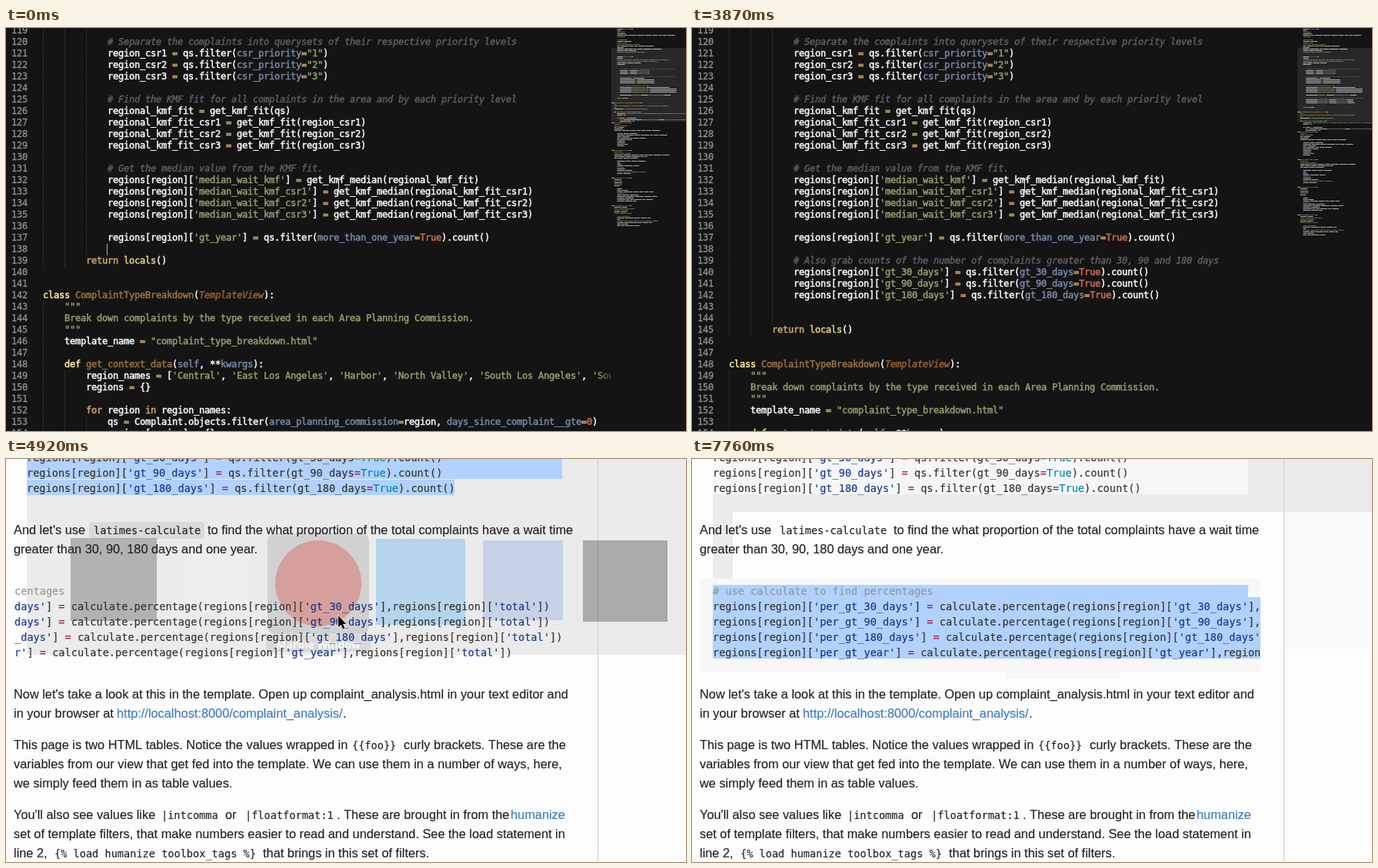
An HTML page with a canvas for the animation above (8000 ms loop, 884 by 525 pixels).

```html
<!DOCTYPE html>
<html lang="en">
<head>
<meta charset="utf-8">
<title>Editor and tutorial</title>
<style>
html, body { margin: 0; width: 884px; height: 525px; overflow: hidden; background: #141414; }
canvas { display: block; }
</style>
</head>
<body>
<canvas id="stage" width="884" height="525"></canvas>
<script>
const W = 884, H = 525, LOOP = 8000;
const ctx = document.getElementById('stage').getContext('2d');
const MONO = '"DejaVu Sans Mono", monospace';
const SANS = '"Liberation Sans", Arial, sans-serif';

// ---------- helpers ----------
const at = (steps, t) => steps.filter(s => s[0] <= t).pop();

function box(x, y, w, h, fill) {
  ctx.fillStyle = fill;
  ctx.fillRect(x, y, w, h);
}

function round(x, y, w, h, r, fill, stroke) {
  ctx.beginPath();
  ctx.roundRect(x, y, w, h, r);
  if (fill) { ctx.fillStyle = fill; ctx.fill(); }
  if (stroke) { ctx.strokeStyle = stroke; ctx.lineWidth = 3; ctx.stroke(); }
}

function disc(x, y, r, fill) {
  ctx.beginPath();
  ctx.arc(x, y, r, 0, Math.PI * 2);
  ctx.fillStyle = fill;
  ctx.fill();
}

function clipTo(x, y, w, h, draw) {
  ctx.save();
  ctx.beginPath();
  ctx.rect(x, y, w, h);
  ctx.clip();
  draw();
  ctx.restore();
}

function poly(points, fill, stroke) {
  ctx.beginPath();
  points.forEach(([x, y]) => ctx.lineTo(x, y));
  ctx.closePath();
  ctx.lineWidth = 1.5;
  ctx.lineJoin = 'round';
  ctx.strokeStyle = stroke;
  ctx.stroke();
  ctx.fillStyle = fill;
  ctx.fill();
}

// Text with a thin outline, for the heavier look of smoothed glyphs
function write(text, x, y, font, color, weight) {
  ctx.font = font;
  ctx.fillStyle = ctx.strokeStyle = color;
  ctx.lineWidth = weight;
  ctx.lineJoin = 'round';
  ctx.fillText(text, x, y);
  ctx.strokeText(text, x, y);
}

// ---------- syntax colouring ----------
function lexer(plain, rules) {
  const re = new RegExp(rules.map(r => `(${r[1]})`).join('|'), 'g');
  const cache = new Map();
  return line => {
    if (cache.has(line)) return cache.get(line);
    const out = [];
    let pos = 0;
    const add = (col, text, color, italic) => text.trim() && out.push({ col, text, color, italic });
    for (const m of line.matchAll(re)) {
      const [color, , italic] = rules[m.slice(1).findIndex(g => g !== undefined)];
      add(pos, line.slice(pos, m.index), plain);
      add(m.index, m[0], color, italic);
      pos = m.index + m[0].length;
    }
    add(pos, line.slice(pos), plain);
    cache.set(line, out);
    return out;
  };
}

const lexDark = lexer('#f8f8f8', [
  ['#5f5a60', '#.*', true],
  ['#8f9d6a', '"""|Break down .*|"[^"]*"|\'[^\']*\'?'],
  ['#f9ee98', '\\b(?:class|def)\\b'],
  ['#cda869', '\\b(?:return|for|in)\\b'],
  ['#dad085', '\\blocals\\b'],
  ['#9b703f', '(?<=def |class )\\w+'],
  ['#9b5c2e', 'TemplateView', true],
  ['#cf6a4c', '\\b(?:True|\\d+)\\b'],
  ['#7587a6', '\\w+(?==)|\\bself\\b|\\bkwargs\\b'],
  ['#cda869', '=']
]);

const lexLight = lexer('#333333', [
  ['#969896', '#.*'],
  ['#183691', "'[^']*'"],
  ['#a71d5d', '='],
  ['#0086b3', 'True']
]);

function code(tokens, x, y, size, pitch, weight) {
  for (const k of tokens) {
    const font = `${k.italic ? 'italic ' : ''}${size}px ${MONO}`;
    write(k.text, x + k.col * pitch, y, font, k.color, weight);
  }
}

// ---------- editor ----------
const FIRST = 119;
const PAD = ' '.repeat(12);
const indent = lines => lines.map(s => PAD + s);

const head = indent([
  '',
  '# Separate the complaints into querysets of their respective priority levels',
  ...[1, 2, 3].map(n => `region_csr${n} = qs.filter(csr_priority="${n}")`),
  '',
  '# Find the KMF fit for all complaints in the area and by each priority level',
  'regional_kmf_fit = get_kmf_fit(qs)',
  ...[1, 2, 3].map(n => `regional_kmf_fit_csr${n} = get_kmf_fit(region_csr${n})`),
  '',
  '# Get the median value from the KMF fit.',
  ...['', '_csr1', '_csr2', '_csr3'].map(s =>
    `regions[region]['median_wait_kmf${s}'] = get_kmf_median(regional_kmf_fit${s})`),
  '',
  "regions[region]['gt_year'] = qs.filter(more_than_one_year=True).count()",
  ''
]);

const dayCount = n => `regions[region]['gt_${n}_days'] = qs.filter(gt_${n}_days=True).count()`;
const DAYS = [30, 90, 180];
const pasted = indent([
  '# Also grab counts of the number of complaints greater than 30, 90 and 180 days',
  ...DAYS.map(dayCount)
]);

const tail = [
  '        return locals()',
  '',
  '',
  'class ComplaintTypeBreakdown(TemplateView):',
  '    """',
  '    Break down complaints by the type received in each Area Planning Commission.',
  '    """',
  '    template_name = "complaint_type_breakdown.html"',
  '    ',
  '    def get_context_data(self, **kwargs):',
  "        region_names = ['Central', 'East Los Angeles', 'Harbor', 'North Valley', 'South Los Angeles', 'South Valley']",
  '        regions = {}',
  '        ',
  '        for region in region_names:',
  '            qs = Complaint.objects.filter(area_planning_commission=region, days_since_complaint__gte=0)',
  '            regions[region] = {}'
];

const edits = [
  [0, []],
  [1640, [PAD]],
  [2090, pasted],
  [2390, [...pasted, PAD]],
  [3130, [...pasted, PAD, PAD]]
];

// time, x, line, opacity
const carets = [
  [0, 131, 138, 1], [150, 159, 138, 1], [450, 159, 138, .5], [600, 159, 138, 0],
  [1200, 131, 138, 1], [1640, 131, 139, 1], [2090, 607, 142, 1], [2390, 131, 143, 1],
  [2830, 131, 143, .5], [3130, 131, 144, 1], [3580, 131, 144, .6], [3720, 131, 144, .3],
  [3870, 131, 144, 0], [4170, 131, 144, 1]
];

// Off-screen code, only seen in the minimap
function filler(count, seed) {
  const rnd = () => (seed = seed * 16807 % 2147483647) / 2147483647;
  return Array.from({ length: count }, (_, i) => {
    const k = i % 18;
    if (k > 15 || k === 6) return '';
    if (!k) return 'class Listing(TemplateView):';
    const pad = ' '.repeat(k < 6 ? 4 : 8);
    const words = Array.from({ length: 1 + Math.floor(rnd() * rnd() * 9) },
      () => 'x'.repeat(4 + Math.floor(rnd() * 9))).join(' ');
    return pad + (k === 2 || rnd() < .25 ? `"${words}"` : words);
  });
}
const above = filler(25, 77).map(s => s && '        ' + s.trim().replace('class ', ''));
const below = filler(68, 4021);

function minimap(lines) {
  box(787, 0, 97, H, '#141414');
  box(787, 26, 97, 96, '#282828');
  ctx.globalAlpha = .65;
  [...above, ...lines, ...below].forEach((line, i) => {
    for (const k of lexDark(line)) {
      for (const m of k.text.matchAll(/\S+/g)) {
        box(787 + (k.col + m.index) * .93, 1 + i * 2, m[0].length * .93, 1, k.color);
      }
    }
  });
  ctx.globalAlpha = 1;
}

function editor(t) {
  box(0, 0, W, H, '#141414');
  const lines = [...head, ...at(edits, t)[1], ...tail];
  clipTo(0, 0, 787, H, () => {
    ctx.letterSpacing = '-0.224px';
    lines.forEach((line, i) => {
      const top = i * 15 - 4;
      write(FIRST + i, 7, top + 11, `12px ${MONO}`, '#8f908a', .3);
      const guides = line.match(/^ */)[0].length / 4;
      for (let g = 0; g < guides; g++) {
        for (let d = 0; d < 15; d += 2) box(48 + g * 28, top + d, 1, 1, '#3c3c3c');
      }
      code(lexDark(line), 48, top + 11, 12, 7, .5);
    });
    const fade = ctx.createLinearGradient(768, 0, 790, 0);
    fade.addColorStop(0, 'rgba(20,20,20,0)');
    fade.addColorStop(1, 'rgba(20,20,20,.85)');
    box(768, 0, 19, H, fade);
  });
  minimap(lines);

  const [, x, line, alpha] = at(carets, t);
  ctx.globalAlpha = alpha;
  box(x, (line - FIRST) * 15 - 4, 1, 15, '#b0b0b0');
  ctx.globalAlpha = 1;
  if (x === 607) box(594, 355, 13, 1, '#a0a0a0');
}

// ---------- app switcher ----------
function icons() {
  box(84, 103, 112, 108, '#4b4b4b');
  box(232, 116, 84, 84, '#f2f2f2');
  disc(406, 162, 56, '#dc4a3d');
  box(481, 104, 116, 112, '#55acee');
  box(620, 106, 104, 104, '#86a4dc');
  box(750, 106, 110, 106, '#353535');
}

function label(color) {
  ctx.font = 'bold 14px "Open Sans", sans-serif';
  ctx.textAlign = 'center';
  ctx.fillStyle = color;
  ctx.fillText('Marble Window', 406, 247);
  ctx.textAlign = 'left';
}

function switcher() {
  round(53, 69, 840, 186, 22, 'rgba(12,12,12,.5)');
  round(339.5, 95.5, 133, 133, 9, 'rgba(10,10,10,.6)', '#f4f4f4');
  icons();
  label('#ffffff');
}

function ghostSwitcher(alpha) {
  ctx.globalAlpha = alpha;
  round(340, 97, 132, 131, 9, 'rgba(0,0,0,.3)');
  icons();
  ctx.globalAlpha = 1;
  round(338, 229, 136, 22, 6, 'rgba(0,0,0,.08)');
  label('#f8f8f8');
}

// ---------- pointers ----------
function beam(x, y, color) {
  box(x, y - 7, 1, 15, color);
  for (const dy of [-8, 8]) {
    box(x - 3, y + dy, 3, 1, color);
    box(x + 1, y + dy, 3, 1, color);
  }
}

function arrow(x, y) {
  poly([[0, 0], [0, 15], [3.5, 12], [6, 17.5], [8.5, 16.5], [6, 11], [10.5, 11]]
    .map(([a, b]) => [x + a, y + b]), '#000', '#fff');
}

function hand(x, y) {
  poly([[0, 0], [2, 0], [3, 6], [10, 7], [11, 10], [9, 16], [2, 16], [-3, 9], [-1, 8], [0, 9]]
    .map(([a, b]) => [x + a, y + b]), '#fff', '#111');
}

// ---------- web page ----------
const PITCH = 8.187, LINK = '#3f7cc4', BLUE = '#b1d1ff', GREY = '#ebebeb';

const percent = key =>
  `regions[region]['per_gt_${key}'] = calculate.percentage(regions[region]['gt_${key}'],regions[region]['total'])`;
const snippet = ['# use calculate to find percentages',
  ...['30_days', '90_days', '180_days', 'year'].map(percent)];

// x, baseline, text, kind
const prose = [
  [10, 98, "And let's use"], [114, 98, 'latimes-calculate', 'code'],
  [262, 98, 'to find the what proportion of the total complaints have a wait time'],
  [10, 123, 'greater than 30, 90, 180 days and one year.'],
  [10, 312, "Now let's take a look at this in the template. Open up complaint_analysis.html in your text editor and"],
  [10, 337, 'in your browser at'], [144, 337, 'http://localhost:8000/complaint_analysis/', 'link'], [438, 337, '.'],
  [10, 378, 'This page is two HTML tables. Notice the values wrapped in'], [450, 378, '{{foo}}', 'code'],
  [517, 378, 'curly brackets. These are the'],
  [10, 403, 'variables from our view that get fed into the template. We can use them in a number of ways, here,'],
  [10, 428, 'we simply feed them in as table values.'],
  [10, 469, "You'll also see values like"], [202, 469, '|intcomma', 'code'], [285, 469, 'or'],
  [311, 469, '|floatformat:1', 'code'], [430, 469, '. These are brought in from the'],
  [656, 469, 'humanize', 'link'],
  [10, 494, 'set of template filters, that make numbers easier to read and understand. See the load statement in'],
  [10, 519, 'line 2,'], [63, 519, '{% load humanize toolbox_tags %}', 'code'],
  [334, 519, 'that brings in this set of filters.']
];

// time, x, y
const moves = [
  [0, 432, 205], [5220, 405, 198], [5370, 316, 232], [5520, 412, 277], [5670, 552, 277],
  [5810, 632, 268], [5960, 673, 262], [6110, 668, 256], [6260, 660, 251],
  [6410, 610, 248], [6560, 480, 228], [6710, 330, 196], [6860, 215, 168], [7010, 40, 170]
];
const scrolls = [[0, 237], [7010, 130], [7160, 0]];

function selection(t, x, y, shift) {
  if (t < 6410) {
    box(27, 0, 696, 26, BLUE);
    box(27, 27, 556, 20, BLUE);
    return;
  }
  const row = Math.max(0, Math.floor((y - 160) / 20));
  const left = 27 - Math.min(shift, 16);
  for (let i = row; i < snippet.length; i++) {
    const end = 27 - shift + snippet[i].length * PITCH;
    let from = i === row ? x : left;
    let to = end;
    if (i === 0) {
      from = t < 7010 ? 76 : left;
      to = 723 - shift;
    }
    const top = i ? 160 + i * 20 : 164;
    box(from, top, to - from, 180 + i * 20 - top, BLUE);
  }
}

function page(t) {
  box(0, 0, W, H, '#fdfdfd');
  const fading = t < 5070;
  const shift = at(scrolls, t)[1];
  const right = t < 7160 ? 723 : 739;
  const [, mx, my] = at(moves, t);

  if (fading) {
    box(27, 0, 857, 255, GREY);
    round(108, 82, 150, 22, 4, '#d9d9d9');
  } else {
    box(723, 0, 161, 46, GREY);
    box(27, 46, 857, 23, GREY);
    box(27, 69, 26, 87, GREY);
    box(770, 69, 114, 186, '#fafafa');
    box(27, 0, 696, 46, '#f6f6f6');
    if (t >= 5670) box(409, 273, 147, 13, '#f7f7f7');
    box(11, 156, right - 11, t < 7160 ? 116 : 121, '#f7f7f7');
  }
  box(769, 0, 1, H, '#cccccc');
  if (fading) ghostSwitcher(t < 4920 ? .7 : .36);

  ctx.letterSpacing = '0px';
  clipTo(11, 0, right - 11, 290, () => selection(t, mx, my, shift));
  DAYS.forEach((n, i) => code(lexLight(dayCount(n)), 27, 3 + i * 20, 13.6, PITCH, .15));
  clipTo(11, 156, right - 11, 121, () =>
    snippet.forEach((s, i) => code(lexLight(s), 27 - shift, 177 + i * 20, 13.6, PITCH, .15)));

  for (const [x, y, text, kind] of prose) {
    const font = kind === 'code' ? `13.6px ${MONO}` : `16.35px ${SANS}`;
    write(text, x, y, font, kind === 'link' ? LINK : '#222222', .15);
  }

  if (t >= 7010 && t < 7760) {
    round(13 + shift * .68, 269, 545, 7, 3.5, `rgba(0,0,0,${t < 7610 ? .45 : .2})`);
  }
  if (t < 5220) arrow(432, 204);
  else if (t < 7160) beam(mx, my, '#111111');
}

// ---------- playback ----------
function draw(t) {
  ctx.letterSpacing = '0px';
  if (t >= 4770) return page(t);
  editor(t);
  ctx.letterSpacing = '0px';
  if (t >= 4320) {
    switcher();
    hand(431, 206);
  } else {
    beam(432, 205, '#e4e4e4');
  }
}

const start = performance.now();
function tick() {
  draw((performance.now() - start) % LOOP);
  requestAnimationFrame(tick);
}
tick();
</script>
</body>
</html>
```
